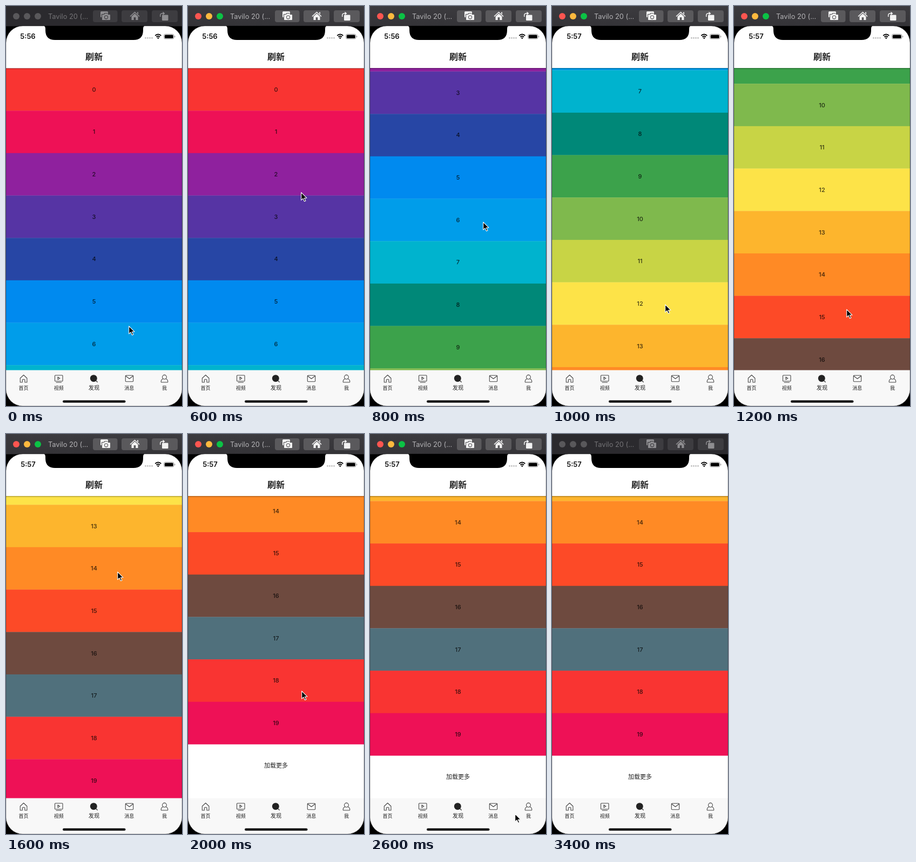
Recreate the animation shown at these times as an HTML page. Size 326 by 742 pixels, loop 3.6 s.

```html
<!DOCTYPE html>
<html lang="zh-CN">
<head>
<meta charset="utf-8">
<title>刷新</title>
<style>
  html, body { margin: 0; width: 100%; height: 100%; overflow: hidden; background: #000; }
  svg { display: block; width: 326px; height: 742px; font-family: Inter, "Noto Sans CJK SC", "Noto Sans CJK", sans-serif; }
  text { text-anchor: middle; }
  .cjk { font-family: "Noto Sans CJK SC", "Noto Sans CJK", sans-serif; fill: #222; }
  .line { fill: none; stroke: #444; stroke-width: 1.1; stroke-linejoin: round; stroke-linecap: round; }
  .bar { fill: url(#barOn); }
  .name { fill: #b4b3b6; text-anchor: start; }
  .btn { fill: #5a595c; }
  .icon { fill: #f2f2f2; stroke: none; }
  .cut { fill: #5a595c; }
  .idle .bar { fill: #2b2a2e; }
  .idle .name { fill: #747376; }
  .idle .btn, .idle .cut { fill: #3d3c40; }
  .idle .icon { fill: #8e8d90; }
  .idle .light { fill: #59585b; }
</style>
</head>
<body>
<svg viewBox="0 0 326 742">
  <defs>
    <linearGradient id="barOn" x2="0" y2="1">
      <stop stop-color="#3c3b3f"/><stop offset="1" stop-color="#343337"/>
    </linearGradient>
    <linearGradient id="shade" x2="0" y2="1">
      <stop stop-opacity=".3"/><stop offset="1" stop-opacity="0"/>
    </linearGradient>
    <clipPath id="screen"><rect y="37" width="326" height="705" rx="31"/></clipPath>
    <clipPath id="view"><rect y="115" width="326" height="561"/></clipPath>
  </defs>

  <rect width="326" height="742"/>
  <g id="win">
    <rect class="bar" width="326" height="37.5"/>
    <circle class="light" cx="19" cy="19" r="6" fill="#fc5550"/>
    <circle class="light" cx="39" cy="19" r="6" fill="#fdb93e"/>
    <circle class="light" cx="59" cy="19" r="6" fill="#0bc245"/>
    <text class="name" x="78" y="23.7" font-size="12.8">Tavilo 20 (...</text>
    <rect class="btn" x="161" y="8" width="45.5" height="22" rx="4"/>
    <rect class="btn" x="214" y="8" width="48" height="22" rx="4"/>
    <rect class="btn" x="270" y="8" width="48" height="22" rx="4"/>
    <!-- camera -->
    <rect class="icon" x="175" y="10" width="14" height="11" rx="1.5"/>
    <path class="cut" d="M177 15h4l1.5-2h5l1.5 2h4v12h-16z"/>
    <path class="icon" d="M179 16h2.8l1.4-2h4.6l1.4 2h2.8q1 0 1 1v8q0 1-1 1h-13q-1 0-1-1v-8q0-1 1-1z"/>
    <circle class="cut" cx="185.5" cy="20.8" r="3.6"/>
    <circle class="icon" cx="185.5" cy="20.8" r="2.5"/>
    <!-- home -->
    <path class="icon" d="M238.500 10.500l9 8.300-1 1.100-8-7.400-8 7.400-1-1.100zM243 11.500h2v4l-2-2zM238.500 14l6 5.500v6.500h-4.200v-5h-3.600v5h-4.200v-6.500z"/>
    <!-- rotate -->
    <rect class="icon" x="289" y="16.500" width="11.500" height="10.500" rx="1.3"/>
    <path class="icon" d="M285 20v-2.500q0-4.500 4.500-4.500h1v-2.600l4 3.300-4 3.300v-2.500h-1q-3 0-3 3v2.500z"/>
  </g>

  <g clip-path="url(#screen)">
    <rect y="37" width="326" height="705" fill="#fff"/>
    <g clip-path="url(#view)"><g id="list"></g></g>
    <rect y="115" width="326" height="3" fill="url(#shade)"/>
    <path d="M67 36q6 0 6 6v3q0 18 18 18h145q18 0 18-18v-3q0-6 6-6z"/>

    <text id="clock" y="61.300" font-size="13" font-weight="600" fill="#111"></text>
    <g fill="#bbb">
      <circle cx="258.500" cy="59.300" r="1.400"/><circle cx="262.500" cy="59.300" r="1.400"/>
      <circle cx="266.500" cy="59.300" r="1.400"/><circle cx="270.500" cy="59.300" r="1.400"/>
    </g>
    <g fill="none" stroke="#000" stroke-width="1.900">
      <path d="M276.300 55q5.500-4.800 11 0M278.500 57.500q3.300-2.800 6.600 0"/>
    </g>
    <path d="M281.800 61.300l-2-2.200q2-1.500 4 0z"/>
    <rect x="292.500" y="52.200" width="18.500" height="9" rx="2.600" fill="none" stroke="#999" stroke-width=".9"/>
    <rect x="293.800" y="53.500" width="15.900" height="6.400" rx="1.500"/>
    <rect x="312" y="55.200" width="1.300" height="3" rx=".6" fill="#999"/>
    <text class="cjk" x="163" y="99.500" font-size="16" font-weight="600">刷新</text>

    <rect y="675.500" width="326" height="67" fill="#f8f8f8"/>
    <g class="line">
      <path d="M26.300 690.500l6.300-6 6.300 6v7.500h-4v-4.500q-2.300-2-4.600 0v4.500h-4z"/>
      <path d="M91.500 685h12.500q1 0 1 1v9q0 1-1 1h-12.500q-1 0-1-1v-9q0-1 1-1zM93 698.300h9.500M96 688.200v4.800l4-2.400z"/>
      <path d="M222.500 685.300h12q1.200 0 1.200 1.200v9q0 1.200-1.200 1.200h-12q-1.200 0-1.200-1.200v-9q0-1.200 1.200-1.200zM222 686.500l6.500 5 6.500-5"/>
      <circle cx="293.500" cy="688.300" r="3.900"/>
      <path d="M291 691.500q-3.800 1.200-3.800 5.700 0 .8.800.8h11q.8 0 .8-.8 0-4.500-3.800-5.700"/>
      <path d="M166 694.500l3.200 3" stroke-width="1.600"/>
    </g>
    <circle cx="162.300" cy="690.700" r="6.500" fill="#222"/>
    <g id="tabs"></g>
    <rect x="105" y="731.500" width="116.500" height="4.300" rx="2.150"/>
  </g>
  <rect x="0" y="37" width="326" height="705" rx="31" fill="none" stroke="#000" stroke-opacity=".4" stroke-width="1"/>

  <path id="cursor" d="M.7.800v14.400l3.300-3.100 2.500 5.400 2.400-1.100-2.500-5.200h4.500z" stroke="#fff" stroke-width="1.100" stroke-linejoin="round"/>
</svg>

<script>
const $ = id => document.getElementById(id);
const ROW = 78.67, TOP = 115.5, STEP = 200, COUNT = 18;
const colors = ['#f93432', '#ee1156', '#8f219e', '#5634a4', '#2746a5', '#008aef', '#009dea', '#00b3ce', '#008878',
  '#3ca24b', '#7fb94d', '#c8d445', '#fde348', '#fdb52d', '#ff8a25', '#fd4a27', '#6e4a3f', '#50707c'];

// scroll offset, pointer x, pointer y
const END = 1092.5;
const steps = [
  [0, 227, 593], [0, 224, 540], [0, 215, 430], [0, 209, 345],
  [230, 209, 400], [547, 209, 553], [758, 208, 562], [862, 207, 420],
  [1007, 206, 255], [1128, 208, 360], [1113.5, 210, 476], [1096, 226, 600],
  [END, 252, 699], [END, 268, 704], [END, 300, 722]
];

function add(parent, tag, attrs, text = '') {
  const el = document.createElementNS('http://www.w3.org/2000/svg', tag);
  for (const k in attrs) el.setAttribute(k, attrs[k]);
  el.textContent = text;
  parent.append(el);
}

for (let i = 0; i < 20; i++) {
  const y = TOP + i * ROW;
  add($('list'), 'rect', { y, width: 326, height: ROW + .3, fill: colors[i % colors.length] });
  add($('list'), 'text', { x: 163, y: y + 43.3, 'font-size': 11, 'font-weight': 500, fill: '#000', 'fill-opacity': .75 }, i);
}
add($('list'), 'text', { class: 'cjk', x: 163, y: TOP + 20 * ROW + 43.7, 'font-size': 11 }, '加载更多');

['首页', '视频', '发现', '消息', '我'].forEach((label, i) =>
  add($('tabs'), 'text', { class: 'cjk', x: 32.6 + i * 65.2, y: i === 2 ? 712.4 : 712.2, 'font-size': i === 2 ? 10.3 : 9, 'font-weight': 500 }, label));

function draw(n) {
  const [scroll, x, y] = steps[n] || [END];
  const late = n >= 5;
  $('list').setAttribute('transform', `translate(0 ${-scroll})`);
  $('win').setAttribute('class', n === 0 || n === COUNT - 1 ? 'idle' : '');
  $('clock').textContent = late ? '5:57' : '5:56';
  $('clock').setAttribute('x', late ? 41 : 40.5);
  $('cursor').style.display = steps[n] ? '' : 'none';
  if (steps[n]) $('cursor').setAttribute('transform', `translate(${x} ${y})`);
}

const start = performance.now();
function tick() {
  draw(Math.floor((performance.now() - start) / STEP) % COUNT);
  requestAnimationFrame(tick);
}
tick();
</script>
</body>
</html>
```
